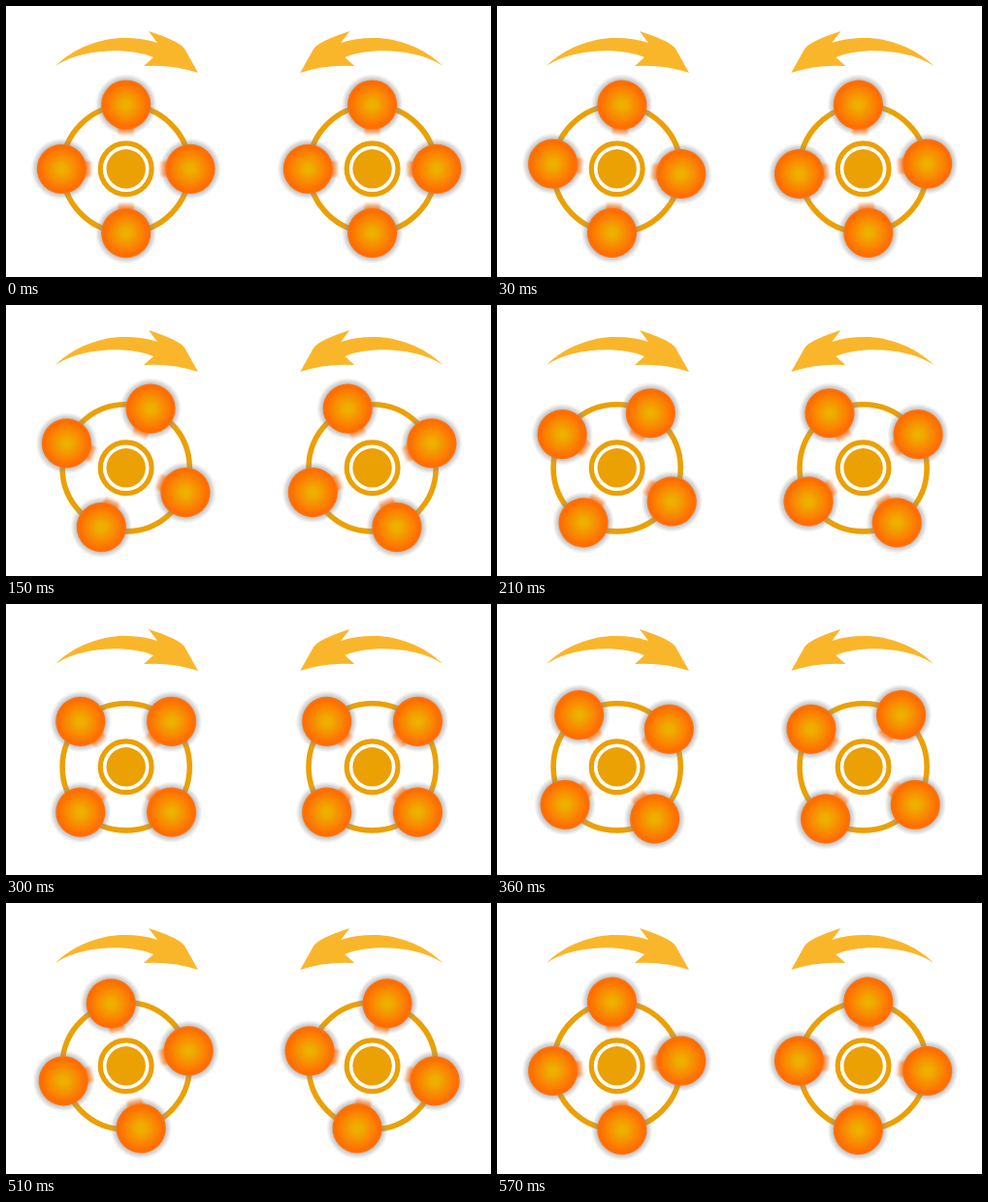
An HTML page for the animation above (0.6 s loop, 500 by 280 pixels).

```html
<!DOCTYPE html>
<html lang="en">
<head>
<meta charset="utf-8">
<title>Counter-rotating wheels</title>
<style>
  html, body { margin: 0; width: 100%; height: 100%; overflow: hidden; background: #fff; }
  svg { display: block; width: 100vw; height: 100vh; }
</style>
</head>
<body>
<svg viewBox="0 0 500 280">
  <defs>
    <radialGradient id="glow">
      <stop offset="0" stop-color="#ecb400"/>
      <stop offset=".2" stop-color="#efaa00"/>
      <stop offset=".65" stop-color="#fb8200"/>
      <stop offset=".9" stop-color="#ff6c00"/>
      <stop offset="1" stop-color="#ff7410"/>
    </radialGradient>
    <radialGradient id="halo">
      <stop offset=".74" stop-color="#808080" stop-opacity=".6"/>
      <stop offset=".86" stop-color="#909090" stop-opacity=".38"/>
      <stop offset="1" stop-color="#a0a0a0" stop-opacity="0"/>
    </radialGradient>
    <linearGradient id="fade" x1="0" y1="0" x2="0" y2="1">
      <stop offset=".35" stop-color="#ff7614"/>
      <stop offset="1" stop-color="#ff9a50" stop-opacity="0"/>
    </linearGradient>
    <filter id="soft" x="-30%" y="-30%" width="160%" height="160%">
      <feGaussianBlur stdDeviation="1.2"/>
    </filter>
    <g id="ball" transform="translate(0 -66.3)">
      <circle r="32" fill="url(#halo)"/>
      <rect x="-8" y="18" width="16" height="15" fill="url(#fade)" filter="url(#soft)"/>
      <circle r="25.6" fill="url(#glow)"/>
    </g>
    <g id="wheel">
      <path fill="#fab62b" d="M51 62C70 43 98 33 122 33Q141 33 156 38L147 26Q178 36 184 44L198 69Q171 60 142 62L152 53C128 43 80 43 51 62Z"/>
      <g transform="translate(123.7 168.3)">
        <g fill="none" stroke="#eba004">
          <circle r="65.6" stroke-width="5.6"/>
          <circle r="26.4" stroke-width="5.2"/>
        </g>
        <circle r="20.2" fill="#eba004"/>
        <g id="balls">
          <use href="#ball"/>
          <use href="#ball" transform="rotate(90)"/>
          <use href="#ball" transform="rotate(180)"/>
          <use href="#ball" transform="rotate(270)"/>
        </g>
      </g>
    </g>
  </defs>
  <use href="#wheel"/>
  <use href="#wheel" transform="translate(501.3 0) scale(-1 1)"/>
</svg>
<script>
  const LOOP = 600, STEP = 30, QUARTER_TURN = 90;
  const balls = document.getElementById("balls");
  const start = performance.now();

  function draw(now) {
    const time = Math.max(0, now - start) % LOOP;
    const angle = Math.floor(time / STEP) * STEP / LOOP * QUARTER_TURN;
    balls.setAttribute("transform", `rotate(${angle})`);
    requestAnimationFrame(draw);
  }
  draw(start);
</script>
</body>
</html>
```
